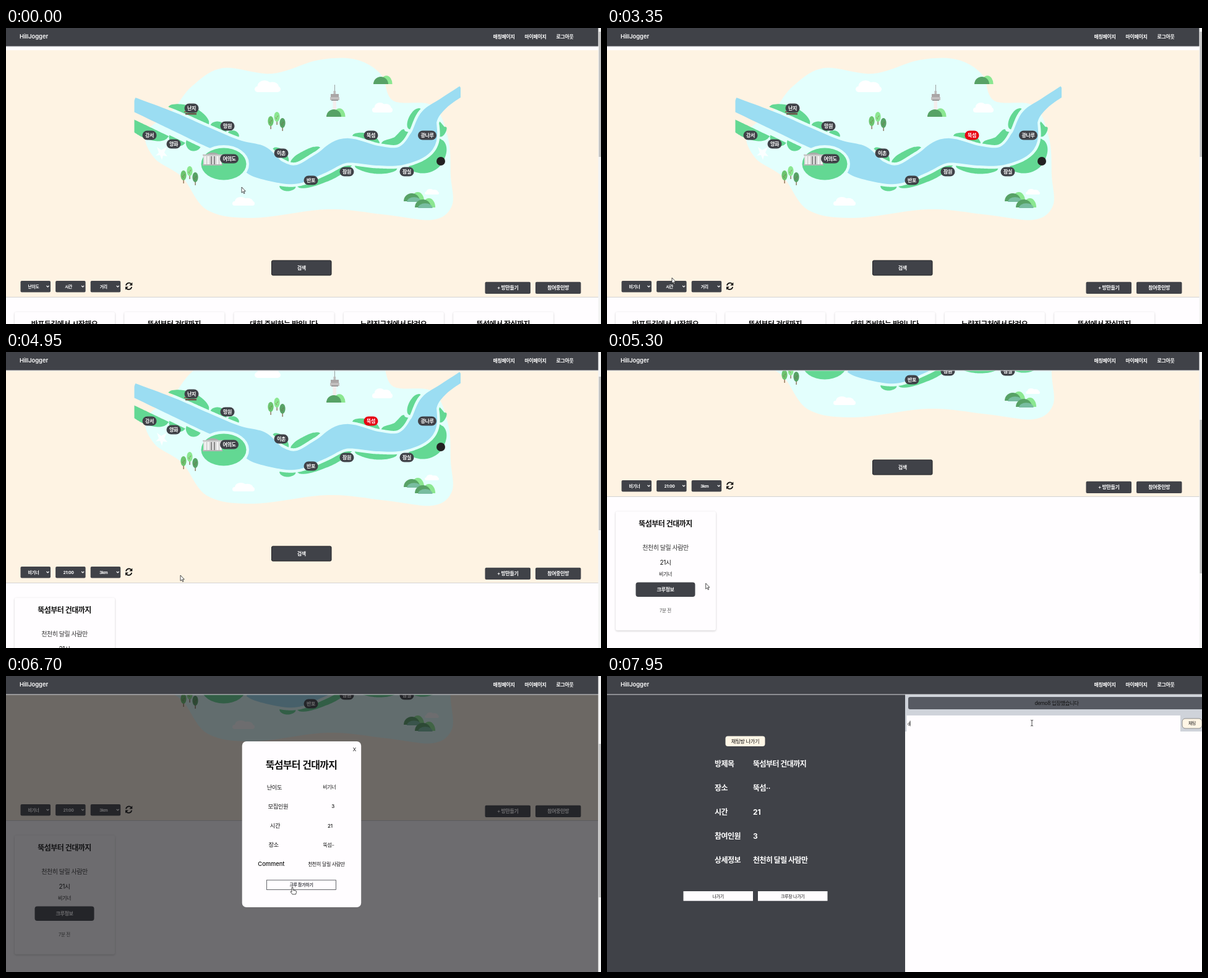
An HTML page that plays this animation: 962 px wide and 480 px high, repeating every 8 s.

```html
<!DOCTYPE html>
<html lang="ko">
<head>
<meta charset="utf-8">
<style>
html, body { margin: 0; width: 100%; height: 100%; overflow: hidden; background: #fffdff; }
svg { display: block; width: 100%; height: 100%; }
text { font-family: Inter, 'Noto Sans CJK KR', 'Noto Sans CJK', sans-serif; white-space: pre; }
.ko { letter-spacing: -.045em; }
.card { filter: drop-shadow(0 1px 1.5px #0003); }
</style>
</head>
<body>
<svg id="stage" viewBox="0 0 962 480"></svg>
<script>
const DARK = '#404248', PAPER = '#fffdff', CREAM = '#fef3e3', MIST = '#e3fffd';
const GREEN = '#63d893', LEAF = '#8be791', PINE = '#57a266', TEAL = '#78bda0';
const LOOP = 8000;

// ---- drawing helpers -------------------------------------------------
const rect = (x, y, w, h, fill, r = 0, extra = '') =>
  `<rect x="${x}" y="${y}" width="${w}" height="${h}" rx="${r}" fill="${fill}" ${extra}/>`;
const ellipse = (x, y, rx, ry, fill, extra = '') =>
  `<ellipse cx="${x}" cy="${y}" rx="${rx}" ry="${ry}" fill="${fill}" ${extra}/>`;
const path = (d, fill, extra = '') => `<path d="${d}" fill="${fill}" ${extra}/>`;
const polygon = (points, fill) => path('M' + points.join('L') + 'Z', fill);

const text = (x, y, size, weight, str, fill = '#111', anchor = 'middle', id = '') =>
  `<text ${id && `id="${id}"`} class="${/[가-힣]/.test(str) ? 'ko' : ''}" x="${x}" y="${y + size * .36}"
    font-size="${size}" font-weight="${weight}" fill="${fill}" text-anchor="${anchor}">${str}</text>`;

const button = (x, y, w, h, label, size = 8, r = 2, extra = '') =>
  rect(x, y, w, h, DARK, r, extra) + text(x + w / 2, y + h / 2, size, 600, label, '#fff');

const range = (n, make) => Array.from({ length: n }, (_, i) => make(i));

// Catmull-Rom value and slope at u through key points (u = index)
function spline(keys, u, closed = false) {
  const n = keys.length, i = Math.min(Math.floor(u), closed ? n - 1 : n - 2), s = u - i;
  const at = k => keys[closed ? (k + n) % n : Math.max(0, Math.min(n - 1, k))];
  const [a, b, c, d] = [at(i - 1), at(i), at(i + 1), at(i + 2)];
  const mix = f => b.map((_, k) => f(b[k], (c[k] - a[k]) / 2, 3 * (c[k] - b[k]) - (c[k] - a[k]) - (d[k] - b[k]) / 2,
    2 * (b[k] - c[k]) + (c[k] - a[k]) / 2 + (d[k] - b[k]) / 2));
  return {
    point: mix((p, v, q, r) => p + s * (v + s * (q + s * r))),
    slope: mix((p, v, q, r) => v + s * (2 * q + 3 * s * r)),
  };
}

// ---- map: a river of varying width, with parks lying along its banks ----
const COURSE = [[205, 123, 11], [268, 150, 14], [320, 174, 15], [370, 196, 16], [406, 215, 26], [440, 233, 18],
  [472, 237, 15], [510, 219, 17], [548, 199, 20], [600, 207, 16], [640, 207, 15], [672, 184, 22], [683, 146, 15],
  [706, 123, 9], [738, 101, 8]];   // x, y, half width
const NORTH = 1, SOUTH = -1;

function bank(u, side, away = 0) {
  const { point: [x, y, half], slope: [dx, dy] } = spline(COURSE, u);
  const reach = side * (half + away) / Math.hypot(dx, dy);
  return [x + dy * reach, y - dx * reach];
}

function stretch(from, to, inner, outer) {
  const steps = range(41, i => i / 40), at = v => from + (to - from) * v;
  return polygon([...steps.map(v => inner(at(v), v)), ...steps.reverse().map(v => outer(at(v), v))], GREEN);
}

function park(side, from, to, thick, gap = 4.5) {
  const swell = v => thick * Math.sqrt(Math.sin(Math.PI * v) + 1e-9);
  return stretch(from, to, u => bank(u, side, gap), (u, v) => bank(u, side, gap + (swell(v) || 0)));
}

const course = range(141, i => i / 10);
const river = polygon([...course.map(u => bank(u, NORTH)), ...course.reverse().map(u => bank(u, SOUTH))], '#9bddf2');

const parks = [
  [NORTH, .8, 2, 15], [NORTH, 2.05, 2.55, 11], [NORTH, 2.6, 2.95, 7], [NORTH, 4.3, 5.4, 11], [NORTH, 5.55, 7.3, 11],
  [NORTH, 8.2, 9.05, 10], [NORTH, 9.1, 11.2, 14], [NORTH, 11.4, 12.15, 9],
  [SOUTH, 0, 1.1, 20, 11], [SOUTH, 1.1, 1.6, 11, 9], [SOUTH, 1.6, 2.05, 12],
  [SOUTH, 5.25, 5.85, 7], [SOUTH, 5.9, 8.3, 10], [SOUTH, 8.4, 9.75, 9], [SOUTH, 10.1, 11.3, 23], [SOUTH, 11.35, 12.2, 12],
].map(p => park(...p)).join('');

const COAST = [[268, 135], [300, 95], [350, 65], [430, 74], [505, 52], [565, 51], [606, 75], [626, 118], [690, 126],
  [715, 180], [719, 240], [721, 288], [690, 311], [615, 303], [520, 294], [400, 308], [325, 295], [285, 242], [240, 211],
  [226, 170]];
const land = polygon(range(COAST.length * 10, i => spline(COAST, i / 10, true).point), MIST);

const island = ellipse(352, 220.5, 36.5, 26, GREEN, `stroke="${MIST}" stroke-width="9" paint-order="stroke"`);
const assembly = path('M324 206a10 4 0 0 1 20 0z', '#aaa') + rect(319, 206, 30, 16, '#dadada') +
  rect(318, 205, 32, 2, '#c4c4c4') + rect(318, 221, 32, 2, '#b5b5b5') +
  range(6, i => rect(321 + i * 5, 208, 2, 13, i === 2 || i === 3 ? '#888' : '#f6f6f6')).join('');
const tower = rect(528.5, 117, 5.5, 16, '#f4eeee') + rect(531, 92, .8, 15, '#888') + rect(529.5, 102, 3.5, 5, '#bbb') +
  rect(525, 107, 13, 5, '#aaa6a6') + rect(524, 112, 15, 5, '#c2bfbf') + rect(526, 116, 11, 2, '#999');

const tree = (x, y, fill) => rect(x - .5, y, 1.2, 13, '#7d5a3c') + ellipse(x, y, 4.6, 8, fill) +
  path(`M${x} ${y + 4}l-2-3m2 0l2-3`, 'none', 'stroke="#7d5a3c" stroke-width=".6"');
const grove = (x, y) => tree(x, y, '#6cc46f') + tree(x + 10, y - 7, LEAF) + tree(x + 19, y + 3, PINE);
const dome = (x, y, rx, ry, fill) => path(`M${x - rx} ${y}a${rx} ${ry} 0 0 1 ${2 * rx} 0z`, fill);
const hill = (x, y, r, front = false) => dome(x + r * .75, y, r * .8, r * 1.15, LEAF) + dome(x, y, r, r, PINE) +
  (front ? dome(x + r * .3, y + 1, r * .9, r * .6, TEAL) : '');
const cloud = (x, y, w, h) => rect(x, y + h * .5, w, h * .5, '#fff', h * .25) +
  ellipse(x + w * .38, y + h * .5, w * .27, h * .5, '#fff') + ellipse(x + w * .68, y + h * .55, w * .25, h * .42, '#fff');

const plane = path('M244 193l7 5 9-5-4 9 5 6-7-1-2 7-3-8-7 1 5-5z', '#fff', 'opacity=".85"');
const bridge = rect(288, 135, 21, 2, '#8d6455') + rect(290, 138, 18, 2.5, '#6d5148');
const scenery = cloud(402, 85, 42, 19) + cloud(592, 121, 33, 16) + cloud(366, 274, 36, 14) + cloud(677, 261, 23, 9) +
  grove(428, 151) + grove(287, 239) + tower + hill(530, 144, 12) + hill(606, 91, 12) +
  hill(656, 281, 13, true) + hill(674, 291, 13, true) + plane + bridge + ellipse(703, 216, 7, 7, '#222');

function pill(x, y, name, id = '') {
  const w = 9 + name.length * 7;
  return rect(x - w / 2, y - 7.5, w, 15, DARK, 7.5, id && `id="${id}"`) + text(x, y, 8, 700, name, '#fff');
}
const pills = [[300, 130, '난지'], [358, 159, '망원'], [232, 174, '강서'], [271, 188, '양화'], [361, 212, '여의도'],
  [445, 203, '이촌'], [493, 247, '반포'], [551, 233, '잠원'], [648, 233, '잠실'], [590, 174, '뚝섬', 'spot'],
  [681, 174, '광나루']].map(p => pill(...p)).join('');

const map = `<clipPath id="frame">${rect(207.5, 40, 527.5, 280, '#000')}</clipPath>
  <g clip-path="url(#frame)">${land + river + parks + island}</g>` + scenery + assembly + pills;

// ---- page ------------------------------------------------------------
const select = (i, label, id) => {
  const x = 23.5 + i * 56.6;
  return rect(x, 410, 48.5, 18.5, DARK, 2) + text(x + 21, 419.3, 6.8, 700, label, '#fff', 'middle', id) +
    path(`M${x + 42} 418l2 2 2-2`, 'none', 'stroke="#fff" stroke-width="1.1"');
};
const refresh = path('M194 417.5a5 5 0 0 1 8.4-2.7M203.2 419.8a5 5 0 0 1-8.4 2.7', 'none', 'stroke="#111" stroke-width="1.8"') +
  path('M204.3 412.5v5h-5zM193 424.5v-5h5z', '#111');

const card = (i, title) => rect(14 + i * 177.3, 460.5, 162, 193, PAPER, 3, 'class="card"') +
  text(94.5 + i * 177.3, 481, 12, 600, title);
const allCards = ['반포둑길에서 시작해요', '뚝섬부터 건대까지', '대회 준비하는 방입니다', '노량진근처에서 달려요', '뚝섬에서 잠실까지']
  .map((title, i) => card(i, title)).join('');
const match = card(0, '뚝섬부터 건대까지') + text(94.5, 519, 10, 400, '천천히 달릴 사람만', '#333') +
  text(94.5, 543, 10, 400, '21시') + text(94.5, 562, 8, 400, '비기너') +
  button(46.5, 575.5, 96, 23.5, '크루정보', 8, 4, 'id="info"') + text(94.5, 621.5, 7.5, 400, '7분 전', '#555');

const page = rect(0, 36, 958, 400, CREAM) + rect(0, 436, 958, 1, '#d3d3d3') + map +
  button(429.5, 377, 96.5, 24, '검색', 8, 2, 'stroke="#1f2024"') +
  select(0, '난이도', 'level') + select(1, '시간', 'hour') + select(2, '거리', 'distance') + refresh +
  button(774.5, 411.7, 73.5, 19.3, '+ 방만들기') + button(856, 411.7, 73.5, 19.3, '참여중인방') +
  `<g id="all">${allCards}</g><g id="match">${match}</g>`;

const header = rect(0, 0, 962, 30, DARK) + rect(0, 29.5, 962, 1, '#d8d8dc') +
  text(22, 14, 9.3, 600, 'HillJogger', '#fff', 'start') +
  text(787.5, 14, 8, 700, '매칭페이지', '#fff', 'start') + text(838.5, 14, 8, 700, '마이페이지', '#fff', 'start') +
  text(889.5, 14, 8, 700, '로그아웃', '#fff', 'start');

const modalRow = ([label, value], i) => `<g class="row">${
  text(433, 180.5 + i * 31.1, 9.3, 500, label) + text(522, 180.5 + i * 31.1, 8, 500, value)}</g>`;
const modal = rect(0, 0, 962, 480, 'rgba(20,20,24,.62)') + rect(381.7, 106, 192.5, 269, PAPER, 7) +
  text(563.5, 119, 8, 400, 'X') + text(477.5, 144, 16, 600, '뚝섬부터 건대까지') +
  [['난이도', '비기너'], ['모집인원', '3'], ['시간', '21'], ['장소', '뚝섬··'], ['Comment', '천천히 달릴 사람만']]
    .map(modalRow).join('') +
  rect(421.5, 331, 112, 15.5, DARK, 0, `id="join" stroke="${DARK}" stroke-width=".8"`) +
  text(477.5, 338.7, 7, 600, '크루 참가하기', '#fff', 'middle', 'joinText');

// ---- chat room -------------------------------------------------------
const roomRow = ([label, value], i) => text(174, 143 + i * 38.8, 12, 700, label, '#fff', 'start') +
  text(236, 143 + i * 38.8, 12, 700, value, '#fff', 'start');
const room = rect(0, 0, 482, 480, DARK) + rect(482, 0, 480, 480, PAPER) +
  rect(191.5, 97.5, 64, 16.5, '#fff6e6', 4) + text(223.5, 105.8, 8.3, 400, '채팅방 나가기') +
  [['방제목', '뚝섬부터 건대까지'], ['장소', '뚝섬··'], ['시간', '21'], ['참여인원', '3'], ['상세정보', '천천히 달릴 사람만']]
    .map(roomRow).join('') +
  rect(123.5, 349, 112.5, 15.7, PAPER) + text(179.7, 357, 7, 400, '나가기') +
  rect(244, 349, 112.5, 15.7, PAPER) + text(300.2, 357, 7, 400, '크루장 나가기') +
  rect(482, 30, 480, 60, '#cfd3da') + rect(487, 34, 480, 20, '#575a62', 3) +
  text(727, 44, 8.3, 400, 'demo8 입장했습니다') + rect(484.5, 64, 442.5, 26.5, PAPER) +
  rect(930, 69, 32, 16, '#fff6e6', 5, 'stroke="#777" stroke-width=".8"') + text(946, 77, 6.8, 400, '채팅') +
  text(486, 77, 7, 400, 'd', '#111', 'start', 'typed') + rect(489.7, 72.5, .7, 9, '#111', 0, 'id="caret"');

const outlined = 'stroke="#222" stroke-width=".8"';
const pointer = path('M0 0v9.2l2.1-1.9 1.500 3.2 1.400-.6-1.500-3.2h2.800z', '#fff', `id="arrow" ${outlined}`) +
  path('M-1 1q1-2 2 0v4l4 1q2 .5 1.500 2.500l-1 3.500h-5.500l-3-4q0-1.500 2 0z', '#fff', `id="hand" ${outlined}`) +
  path('M-2-4.500q2 0 2 1 0-1 2-1M0-4v8.500M-2 5q2 0 2-1 0 1 2 1', 'none', `id="beam" ${outlined}`);
const scrollbar = rect(957.5, 0, 5, 480, '#f3f3f3') + rect(958.5, 0, 4, 10, '#c1c1c1', 0, 'id="thumb"');

document.getElementById('stage').innerHTML =
  `<g id="site">${rect(0, 0, 962, 480, PAPER)}<g id="page">${page}</g><g id="modal">${modal}</g></g>
   <g id="room">${room}</g>${header}<g id="scrollbar">${scrollbar}</g><g id="pointer">${pointer}</g>`;

// Space each row's two cells evenly around their widths
for (const row of document.querySelectorAll('.row')) {
  const [label, value] = [...row.children].map(cell => cell.getComputedTextLength());
  row.setAttribute('transform', `translate(${(label - value) / 4} 0)`);
}

// ---- timeline --------------------------------------------------------
const $ = id => document.getElementById(id);
const set = (id, name, value) => $(id).setAttribute(name, value);
const show = (id, on) => { $(id).style.display = on ? '' : 'none'; };
const within = (t, ...spans) => spans.some(([a, b]) => t >= a && t < b);

function ease(t, start, end) {
  const u = Math.max(0, Math.min(1, (t - start) / (end - start)));
  return u * u * (3 - 2 * u);
}

const MOVES = [[200, 800, 592, 174], [1000, 1700, 87, 399], [1750, 2400, 60, 450], [2700, 3300, 105, 405],
  [3450, 4100, 160, 420], [4250, 4550, 470, 388], [4620, 4950, 282, 362], [5050, 5450, 104, 381],
  [5750, 6350, 463, 342], [7480, 7750, 687, 76]];   // start, end, x, y

const pointerAt = t => MOVES.reduce(([x, y], [start, end, toX, toY]) => {
  const s = ease(t, start, end);
  return [x + (toX - x) * s, y + (toY - y) * s];
}, [381, 258]);

function draw() {
  const t = performance.now() % LOOP;
  const scroll = Math.round(202 * ease(t, 4803, 5203));
  const filtered = t >= 4650, inRoom = t >= 6760, joinHover = t >= 6250;

  set('page', 'transform', `translate(0 ${-scroll})`);
  set('thumb', 'y', filtered ? 9 + scroll / 2 : 6);
  set('thumb', 'height', filtered ? 249 : 203);
  set('spot', 'fill', t >= 900 ? '#e60012' : DARK);
  $('level').textContent = t >= 2700 ? '비기너' : '난이도';
  $('hour').textContent = t >= 3850 ? '21:00' : '시간';
  $('distance').textContent = t >= 4220 ? '3km' : '거리';
  set('info', 'fill', within(t, [5420, 5850]) ? '#25272b' : DARK);
  set('join', 'fill', joinHover ? PAPER : DARK);
  set('joinText', 'fill', joinHover ? DARK : '#fff');

  show('all', !filtered);
  show('match', filtered);
  show('modal', t >= 5580);
  show('site', !inRoom);
  show('scrollbar', !inRoom);
  show('room', inRoom);
  show('typed', t >= 7880);
  show('caret', t >= 7800);

  const beam = t >= 7680, hand = within(t, [750, 1080], [4450, 4670], [5400, 5580], [6250, 6760]);
  show('beam', beam);
  show('hand', hand);
  show('arrow', !beam && !hand);
  set('pointer', 'transform', `translate(${pointerAt(t)})`);
  requestAnimationFrame(draw);
}
draw();
</script>
</body>
</html>
```
